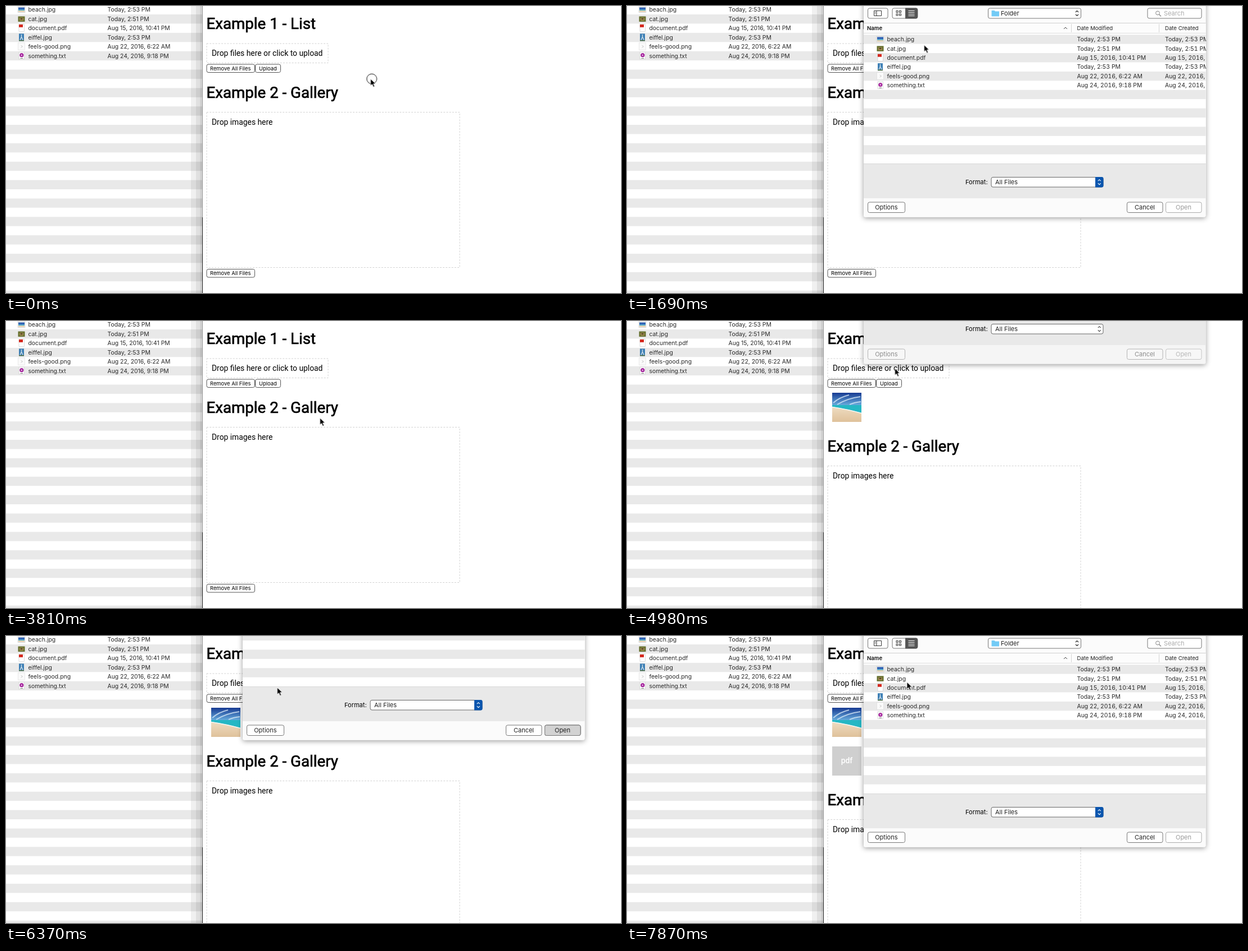
Write an HTML page that moves like this. It is 1094 px wide and 512 px high and loops after 8000 ms.

```html
<!DOCTYPE html>
<html lang="en">
<head>
<meta charset="utf-8">
<title>File upload demo</title>
<style>
html, body { margin: 0; width: 100%; height: 100%; overflow: hidden; background: #fff; }
svg { display: block; width: 1094px; height: 512px; }
text { white-space: pre; }
.ui { font-family: Inter, "Liberation Sans", sans-serif; font-size: 11px; }
.row { font-size: 10.4px; }
.tab { font-variant-numeric: tabular-nums; }
.page { font-family: Roboto, "Liberation Sans", sans-serif; font-size: 13.85px; }
.h1 { font-size: 27.7px; stroke: #000; stroke-width: .65px; }
.small { font-size: 9.4px; }
.head { font-size: 9.6px; }
.drop { fill: none; stroke: #d2d2d2; stroke-dasharray: 3 2.2; }
.shade { filter: drop-shadow(0 2px 5px rgba(0, 0, 0, .4)); }

.lower, .file1, .file2, .sheet, .live, .pick1, .pick2, .press, .ring, .cursor {
  animation: 8s step-end infinite;
}
.lower { animation-name: lower; }
.file1 { animation-name: file1; }
.file2 { animation-name: file2; }
.sheet { animation-name: sheet; }
.live { animation-name: live; }
.pick1 { animation-name: pick1; }
.pick2 { animation-name: pick2; }
.press { animation-name: press; }
.ring { animation-name: ring; }
.cursor { animation-name: cursor; }

@keyframes lower {
  0% { transform: translateY(0); }
  49.5% { transform: translateY(69px); }
  85.25%, 100% { transform: translateY(138px); }
}
@keyframes file1 { 0% { opacity: 0; } 49.5%, 100% { opacity: 1; } }
@keyframes file2 { 0% { opacity: 0; } 85.25%, 100% { opacity: 1; } }
@keyframes sheet {
  0%, 46.375%, 82.5% { transform: translateY(-420px); }
  15.125%, 62.25%, 93.25% { transform: translateY(-300px); }
  16.5%, 63.5%, 94.5% { transform: translateY(-120px); }
  17.875%, 64.75%, 95.875% { transform: translateY(-20px); }
  19.25%, 65.8%, 97.125%, 100% { transform: translateY(0); }
  42.75%, 78.375% { transform: translateY(-40px); }
  43.875%, 79.6% { transform: translateY(-191px); }
  45.125%, 81.125% { transform: translateY(-340px); }
}
@keyframes live {
  0%, 55%, 88% { opacity: 0; }
  21.125%, 67.25%, 98.375%, 100% { opacity: 1; }
}
@keyframes pick1 { 0%, 50%, 100% { opacity: 0; } 30.625% { opacity: 1; } }
@keyframes pick2 { 0%, 84%, 100% { opacity: 0; } 73.5% { opacity: 1; } }
@keyframes press { 0%, 50%, 84%, 100% { opacity: 0; } 41.5%, 76% { opacity: 1; } }
@keyframes ring {
  0%, 10.75%, 29.5%, 40.25%, 57.625%, 73.5%, 76%, 89.875% { opacity: 1; }
  1.125%, 11.75%, 31.625%, 41.5%, 58.875%, 74.75%, 77.25%, 91%, 100% { opacity: 0; }
}
@keyframes cursor {
  0% { transform: translate(648.5px, 130px); }
  5.25% { transform: translate(648.5px, 130px); animation-timing-function: steps(5, jump-start); }
  10.75% { transform: translate(528.5px, 69.5px); }
  23.75% { transform: translate(528.5px, 69.5px); animation-timing-function: steps(2, jump-start); }
  26.5% { transform: translate(496px, 72px); }
  27.25% { transform: translate(496px, 72px); animation-timing-function: steps(2, jump-start); }
  29.5% { transform: translate(494px, 62px); }
  33.875% { transform: translate(494px, 62px); animation-timing-function: steps(3, jump-start); }
  37.8125% { transform: translate(938.5px, 346px); }
  39.125% { transform: translate(975px, 357px); }
  45.125% { transform: translate(975px, 357px); animation-timing-function: steps(3, jump-start); }
  48.75% { transform: translate(558.5px, 173px); }
  52% { transform: translate(558.5px, 173px); animation-timing-function: steps(5, jump-start); }
  57.625% { transform: translate(476.5px, 84.5px); }
  71% { transform: translate(476.5px, 84.5px); animation-timing-function: steps(2, jump-start); }
  73.25% { transform: translate(482.5px, 92px); }
  83.875% { transform: translate(482.5px, 92px); animation-timing-function: steps(3, jump-start); }
  88%, 100% { transform: translate(498px, 82.3px); }
}
</style>
</head>
<body>
<svg id="stage" viewBox="0 0 1094 512" xmlns="http://www.w3.org/2000/svg"></svg>
<script>
const PITCH = 16.42, GREY = '#e9e9e9';
const FILES = [
  ['beach.jpg', 'Today, 2:53 PM'],
  ['cat.jpg', 'Today, 2:51 PM'],
  ['document.pdf', 'Aug 15, 2016, 10:41 PM'],
  ['eiffel.jpg', 'Today, 2:53 PM'],
  ['feels-good.png', 'Aug 22, 2016, 6:22 AM'],
  ['something.txt', 'Aug 24, 2016, 9:18 PM']
];

const rect = (x, y, w, h, fill, more = '') =>
  `<rect x="${x}" y="${y}" width="${w}" height="${h}" fill="${fill}" ${more}/>`;
const path = (d, stroke, more = '') => `<path d="${d}" fill="none" stroke="${stroke}" ${more}/>`;
const text = (x, y, str, cls, fill = '#000', more = '') =>
  `<text x="${x}" y="${y}" class="${cls}" fill="${fill}" ${more}>${str}</text>`;
const button = (x, y, w, h, stroke, fill = '#fff', r = 3) =>
  rect(x, y, w, h, fill, `rx="${r}" stroke="${stroke}"`);

function stripes(x, w, top, bottom) {
  let out = '';
  for (let y = top; y < bottom; y += PITCH * 2)
    out += rect(x, y, w, Math.min(PITCH, bottom - y), GREY);
  return out;
}

// file icons, drawn around their centre
const sheetIcon = rect(-4.5, -6.5, 9.5, 12.5, '#fff', 'stroke="#ccc" stroke-width=".7"');
const ICONS = [
  rect(-6.5, -5, 13, 10, '#f4f4f4', 'stroke="#bbb" stroke-width=".5"') + rect(-5.5, -4, 11, 4, '#2f62b4') +
    rect(-5.5, 0, 11, 1.5, '#3fb0cc') + rect(-5.5, 1.5, 11, 2.5, '#e4cfae'),
  rect(-6, -4.5, 12, 9.5, '#66702f') + rect(-3.5, -2, 7, 5, '#a38b52') + rect(-2, -1, 4, 2, '#4a4020'),
  sheetIcon + rect(-4.5, -6.5, 7, 5, '#d5281e'),
  rect(-4.5, -6.5, 9, 13, '#3d7fb5') + path('M0 -5V0M-2.5 5L0 -1L2.5 5', '#d9e4ea', 'stroke-width="1.3"') +
    rect(-4.5, 5, 9, 1.5, '#4d6b3c'),
  rect(-6, -6.5, 12, 12.5, '#fafafa', 'stroke="#ddd" stroke-width=".6"') + path('M-1 -2L2 0L-1 2', '#bbb', 'stroke-width=".8"'),
  sheetIcon + '<circle cx=".3" cy="-1" r="3.6" fill="#a3259b"/><circle cx=".3" cy="-1" r="1.2" fill="#f0c8ee"/>' +
    rect(-2, 4, 4.5, 1, '#777')
];

function fileRow(i, y0, iconX, nameX, dates, fill, cls) {
  const y = y0 + i * PITCH, base = y + 3.8, [name, date] = FILES[i];
  return `<g transform="translate(${iconX} ${y})">${ICONS[i]}</g>` + text(nameX, base, name, 'ui row', fill) +
    dates.map(x => text(x, base, date, cls, fill)).join('');
}
const fileRows = (...args) => FILES.map((f, i) => fileRow(i, ...args)).join('');

function finder() {
  return rect(0, 0, 349, 512, '#fff') + stripes(0, 349, 15, 512) +
    fileRows(6.6, 27.5, 39.5, [180.5], '#2a2a2a', 'ui row') +
    rect(329, 0, 9, 512, '#000', 'opacity=".06"') + rect(338, 0, 7, 512, '#000', 'opacity=".12"') +
    rect(345, 0, 4, 512, '#000', 'opacity=".18"') +
    rect(349, 0, 1, 377, '#999') + rect(349, 377, 1, 135, '#222');
}

function beach() {
  return `<linearGradient id="sky" x2="0" y2="1"><stop stop-color="#173a92"/><stop offset="1" stop-color="#6db4e2"/></linearGradient>
    <linearGradient id="sand" x2="0" y2="1"><stop stop-color="#f0dfc6"/><stop offset="1" stop-color="#dfc19a"/></linearGradient>` +
    rect(365, 128, 52, 24, 'url(#sky)') +
    path('M367 146Q378 136 395 132M374 149Q392 138 415 135M396 149Q405 145 416 144', '#dcecf8', 'stroke-width="1.8" opacity=".75"') +
    rect(365, 150, 52, 30, 'url(#sand)') +
    '<path d="M365 150H417V164Q392 157 365 153Z" fill="#25b7c4"/>' +
    path('M365 153.5Q392 157.5 417 164.5', '#f2f8f6', 'stroke-width="1.6"');
}

function page() {
  const lower = text(356.5, 164, 'Example 2 - Gallery', 'page h1') +
    '<rect x="357" y="189.5" width="450" height="277" class="drop"/>' +
    text(366, 211.5, 'Drop images here', 'page') +
    button(357, 469.5, 85.5, 14.5, '#555') + text(363, 480.3, 'Remove All Files', 'ui small');
  return rect(350, 0, 744, 512, '#fff') + text(356.5, 41, 'Example 1 - List', 'page h1') +
    '<rect x="357" y="67" width="216" height="34.5" class="drop"/>' +
    text(366, 89, 'Drop files here or click to upload', 'page') +
    button(357, 104, 85.5, 14.5, '#555') + text(363, 114.8, 'Remove All Files', 'ui small') +
    button(443.5, 104, 45, 14.5, '#555') + text(450, 114.8, 'Upload', 'ui small') +
    `<g class="file1">${beach()}</g>` +
    `<g class="file2">${rect(365, 197, 52, 52, '#cfcfcf')}${text(391, 227, 'pdf', 'page', '#fff', 'text-anchor="middle" font-weight="500"')}</g>` +
    `<g class="lower">${lower}</g>`;
}

const chevrons = (x, y, c) =>
  path(`M${x - 2.5} ${y - 2}l2.5 -2.5l2.5 2.5M${x - 2.5} ${y + 2}l2.5 2.5l2.5 -2.5`, c, 'stroke-width="1.1"');

function openButton(ink, edge, fill) {
  return button(958.5, 350, 63.5, 18.5, edge, fill) + text(990, 363.3, 'Open', 'ui', ink, 'text-anchor="middle"');
}

function toolbar(on) {
  const edge = on ? '#777' : '#b4b4b4', ink = on ? '#222' : '#8c8c8c';
  const bg = on ? '#fff' : '#f7f7f7', seg = on ? '#555' : '#9a9a9a';
  let grid = '';
  for (const x of [479, 484.5]) for (const y of [8.5, 14]) grid += rect(x, y, 3, 3, 'none', `stroke="${ink}" stroke-width=".9"`);
  return button(428.5, 4, 35.5, 18, edge, bg) +
    path('M439.5 8.5h13v9h-13zM444 8.5v9M441 11h1.5M441 13h1.5', ink, 'stroke-width=".9"') +
    button(472, 4, 45, 18, edge, bg) + grid +
    `<path d="M495 3.5h19q3 0 3 3v13q0 3 -3 3h-19z" fill="${seg}"/>` +
    path('M500.5 8.5h11M500.5 11.5h11M500.5 14.5h11M500.5 17.5h11', '#fff') +
    button(642.5, 4, 165, 18, edge, bg) +
    `<path d="M648.5 8h5l1.5 1.5h7v9h-13.5z" fill="#72cbf6" opacity="${on ? 1 : .85}"/>` +
    text(665, 17, 'Folder', 'ui', ink) + chevrons(800.5, 13, ink) +
    button(926, 4, 96, 18, edge, bg) +
    `<circle cx="944" cy="12.5" r="3.4" fill="none" stroke="#888"/>` + path('M946.5 15l3.5 3.5', '#888', 'stroke-width="1.2"') +
    text(955, 17, 'Search', 'ui', '#aaa');
}

function fileList() {
  return rect(421, 31, 608.5, 250, '#fff') + rect(421, 31, 608.5, 17, '#fcfcfc') + rect(421, 48, 608.5, 1, '#dcdcdc') +
    text(427, 42.5, 'Name', 'ui head', '#111', 'font-weight="600"') +
    path('M777 41l3 -3l3 3', '#444') +
    text(800.5, 42.5, 'Date Modified', 'ui head', '#222') + text(957, 42.5, 'Date Created', 'ui head', '#222') +
    path('M790.5 32v15M946.5 32v15', '#d4d4d4') +
    stripes(421, 608.5, 51.2, 281) +
    fileRows(59.4, 450.5, 462.5, [800.5, 957], '#2a2a2a', 'ui row tab');
}

function panel(on) {
  const edge = on ? '#777' : '#b4b4b4', ink = on ? '#222' : '#8c8c8c', bg = on ? '#fff' : '#f7f7f7';
  const body = on ? fileList() : rect(421, 31, 608.5, 250, '#fff') + stripes(421, 608.5, 49.2, 281);
  return rect(421, -20, 608.5, 396.5, on ? '#fbfbfb' : '#f5f5f5', 'rx="3"') + toolbar(on) +
    rect(421, 30, 608.5, 1, '#cfcfcf') + body +
    rect(421, 281, 608.5, 1, '#d8d8d8') + rect(421, 282, 608.5, 61, GREY) +
    text(602, 318, 'Format:', 'ui') + button(648, 305.5, 199, 17.5, '#666') + text(655, 318.3, 'All Files', 'ui', '#222') +
    (on ? '<path d="M833 305h11.5q3 0 3 3v12.500q0 3 -3 3h-11.500z" fill="#0a55ae"/>' : '') +
    chevrons(840.3, 314.2, on ? '#fff' : '#444') +
    button(428.5, 350, 66, 18.5, edge, bg) + text(461.3, 363.3, 'Options', 'ui', ink, 'text-anchor="middle"') +
    button(889.5, 350, 63.5, 18.5, edge, bg) + text(921, 363.3, 'Cancel', 'ui', ink, 'text-anchor="middle"') +
    openButton(on ? '#999' : '#b8b8b8', on ? '#aaa' : '#c4c4c4', bg);
}

function picked(i) {
  return rect(421, 51.2 + i * PITCH, 608.5, PITCH, '#05438a') +
    fileRow(i, 59.4, 450.5, 462.5, [800.5, 957], '#fff', 'ui row tab') + openButton('#222', '#777', '#fff');
}

function sheet() {
  return `<g class="sheet">${rect(421, -20, 608.5, 396.5, '#f5f5f5', 'rx="3" class="shade"')}
    <clipPath id="edge">${rect(421, -20, 608.5, 398, '#000')}</clipPath>
    <g clip-path="url(#edge)">${panel(false)}<g class="live">${panel(true)}
      <g class="pick1">${picked(0)}</g><g class="pick2">${picked(2)}</g>
      <g class="press">${openButton('#222', '#777', '#d2d2d2')}</g></g></g></g>`;
}

const cursor = `<g class="cursor">
  <circle class="ring" cx="2.2" cy="0" r="8.900" fill="none" stroke="#111"/>
  <path d="M0 0V12.300L2.900 9.600L5 14.500L7.200 13.500L5.100 8.800H9Z" fill="#000" stroke="#fff" stroke-width=".8"/></g>`;

document.getElementById('stage').innerHTML = page() + finder() + sheet() + cursor;
</script>
</body>
</html>
```
